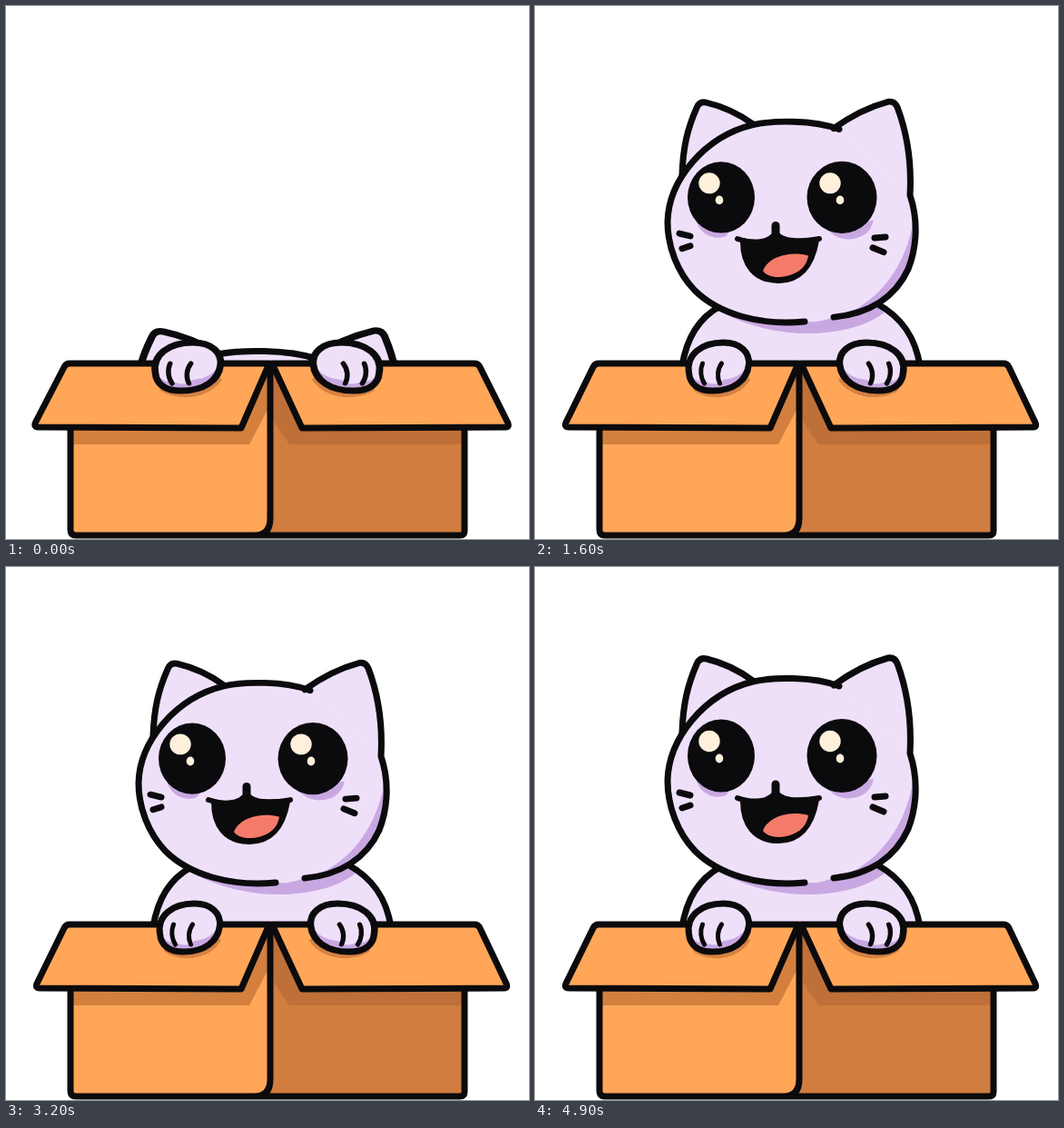
Recreate the animation shown at these times as an HTML page. Size 576 by 586 pixels, loop 5000 ms.

```html
<!DOCTYPE html>
<html lang="en">
<head>
<meta charset="utf-8">
<title>Cat in a box</title>
<style>
  html, body { margin: 0; width: 100%; height: 100%; overflow: hidden; background: #fff; }
  svg { display: block; width: 100%; height: 100%; }
  .line { fill: none; stroke: #0b0a0c; stroke-width: 7; stroke-linecap: round; stroke-linejoin: round; }
  .fur { fill: #efe0fa; }
  .shade { fill: #c9a8e2; }
  .ink { fill: #0b0a0c; }
  .glint { fill: #fff0dc; }
  .light { fill: #ffa658; }
  .dark { fill: #d07d3f; }
  .fold { fill: none; stroke: #df8844; stroke-width: 3; }
</style>
</head>
<body>
<svg viewBox="0 0 576 586" preserveAspectRatio="none">
  <defs>
    <path id="pawShape" d="M-33 6C-36-13-20-27 5-27C24-27 34-16 33-3C31 15 16 26-7 26C-23 26-32 19-33 6Z"/>
    <g id="paw">
      <path d="M-29 25C-14 37 20 38 35 13L20 8Z" fill="#d58242"/>
      <use href="#pawShape" class="fur"/>
      <path class="shade" d="M-33 7C-27 14-21 17-15 16C-7 20-1 19 5 14C18 13 28 6 33-4C31 15 16 26-7 26C-23 26-32 19-33 7Z"/>
      <use href="#pawShape" class="line"/>
      <path class="line" style="stroke-width:5" d="M-18-4C-21 3-20 12-16 18M3-4C-2 3-2 12 1 18"/>
    </g>
    <clipPath id="headClip">
      <path d="M240 126C262 121 306 120 335 131L413 205C422 232 421 262 411 288C397 319 369 338 329 342C314 347 306 348 297 347C247 352 202 338 176 312C157 292 146 263 146 235C147 188 187 139 240 126Z"/>
    </clipPath>
    <clipPath id="rim"><rect width="576" height="470"/></clipPath>
  </defs>

  <g clip-path="url(#rim)">
    <g id="cat">
      <path class="fur" d="M204 330C182 342 167 364 162 396V410H424V396C419 364 404 342 376 327Z"/>
      <path class="shade" d="M206 337C239 354 273 361 306 360C340 359 369 350 386 336L374 327L300 340Z"/>
      <path class="line" d="M204 330C182 342 167 364 162 396M376 327C404 342 419 364 424 396"/>
      <g id="head">
        <path class="fur" d="M162 182C163 151 168 130 178 107Q181 99 189 101C206 105 225 114 240 125L200 160Z"/>
        <path class="line" d="M162 182C163 151 168 130 178 107Q181 99 189 101C206 105 225 114 240 125"/>
        <path class="fur" d="M329 130C348 116 367 106 389 100Q396 99 399 106C409 133 415 168 413 205L350 220Z"/>
        <rect class="fur" x="140" y="118" width="285" height="236" clip-path="url(#headClip)"/>
        <path class="shade" d="M417 232C420 258 415 285 402 304C388 323 366 335 340 339C376 325 408 289 417 232Z"/>
        <path class="line" d="M335 131C306 120 262 121 240 126C187 139 147 188 146 235C146 263 157 292 176 312C202 338 247 352 297 347"/>
        <path class="line" d="M329 130C348 116 367 106 389 100Q396 99 399 106C409 133 415 168 413 205C422 232 421 262 411 288C397 319 369 338 329 342"/>

        <path class="shade" d="M178 236C183 249 196 255 208 252Q213 250 214 244ZM320 241C329 254 345 258 360 251Q370 246 373 233Z"/>
        <ellipse class="ink" cx="205" cy="207.5" rx="37" ry="40"/>
        <ellipse class="ink" cx="338" cy="207.5" rx="38.5" ry="40.5"/>
        <g class="glint">
          <circle cx="192" cy="191.5" r="11.7"/>
          <ellipse cx="203" cy="210.5" rx="4.3" ry="5"/>
          <circle cx="325" cy="191.5" r="11.7"/>
          <ellipse cx="336" cy="210.5" rx="4.3" ry="5"/>
        </g>
        <path class="line" d="M159 248L171 251M162 265L171 262M374 253L386 252M372 264L384 269"/>
        <path class="ink" d="M229 257C242 260 257 258 265 247C273 258 290 259 310 256C305 284 292 301 268 301C241 301 229 282 229 257Z"/>
        <path class="line" style="stroke-width:6" d="M223 254C240 260 258 259 265 247C272 258 290 258 313 254M229 257C229 282 241 301 268 301C292 301 305 284 310 256"/>
        <path class="line" style="stroke-width:9" d="M265 239V247"/>
        <path fill="#f47b69" d="M251 290C256 275 280 267 301 273C299 286 289 295 270 297Q256 297 251 290Z"/>
      </g>
    </g>
  </g>

  <path class="dark" d="M291 394H505V577Q505 582 500 582H280Z"/>
  <path d="M291 394L326 464H503V482H312L294 455Z" fill="#bf6f38"/>
  <path class="light" d="M71 460H259L291 394V563Q291 582 274 582H77Q71 582 71 576Z"/>
  <path d="M74 464H259L289 398V442L268 482H74Z" fill="#d3803f"/>
  <path class="line" d="M71 464V576Q71 582 77 582H500Q505 582 505 577V464M291 394V563Q291 582 274 582"/>
  <path class="light line" id="flapL"/>
  <path class="light line" id="flapR"/>
  <use href="#paw" id="pawL"/>
  <use href="#paw" id="pawR"/>
</svg>

<script>
const LOOP = 5000, STEP = 100, LANDED = 200, CHIN = 348;
const TALL = 97, SHORT = 102.5;

// moments at which the breath turns, from short to tall and back
const turns = [200, 600, 1500, 2300, 3200, 4000, 4500, 4900];

const $ = id => document.getElementById(id);
const clamp = v => Math.min(1, Math.max(0, v));
const mix = (a, b, k) => a + (b - a) * k;
const move = (id, value) => $(id).setAttribute("transform", value);
const flap = (id, d) => $(id).setAttribute("d", d);

function earTop(t) {
  const i = turns.findIndex(v => v > t);
  if (i < 1) return TALL;
  const k = (t - turns[i - 1]) / (turns[i] - turns[i - 1]);
  const wave = (1 - Math.cos(Math.PI * k)) / 2;
  return mix(SHORT, TALL, i % 2 ? wave : 1 - wave);
}

function draw(time) {
  const t = Math.floor((time % LOOP) / STEP) * STEP;
  const drop = 257 * clamp(1 - t / LANDED) ** 1.7;
  const wide = 1 + 0.16 * clamp(1 - t / 100);
  const hit = t < LANDED ? mix(0.6, 1, t / LANDED) : clamp(1 - (t - LANDED) / 400) ** 2;
  const top = earTop(t) + (t < LANDED ? 0 : 1.5 * hit);
  const out = 4.5 * hit ** 2;

  move("cat", `translate(287 ${drop}) scale(${wide} 1) translate(-287 0)`);
  move("head", `translate(0 ${CHIN}) scale(1 ${(CHIN - top) / (CHIN - TALL)}) translate(0 ${-CHIN})`);
  flap("flapL", `M70 393H290L259 464L${37 - out} 463Q${32 - out} 463 ${34 - out} 458L64 397Q66 393 70 393Z`);
  flap("flapR", `M293 393H516Q520 393 522 397L${551 + out} 458Q${553 + out} 463 ${549 + out} 463L326 464Z`);
  move("pawL", `translate(${202.5 - 3.5 * hit} 397) scale(${1 + 0.15 * hit} 1)`);
  move("pawR", `translate(${370.5 + 7 * hit} 397) scale(${-1.06 - 0.07 * hit} 1)`);
}

// fills given here so that the outlined flaps keep their colour
for (const id of ["flapL", "flapR"]) $(id).style.fill = "#ffa658";

const start = performance.now();
function tick() {
  draw(performance.now() - start);
  requestAnimationFrame(tick);
}
tick();
</script>
</body>
</html>
```
